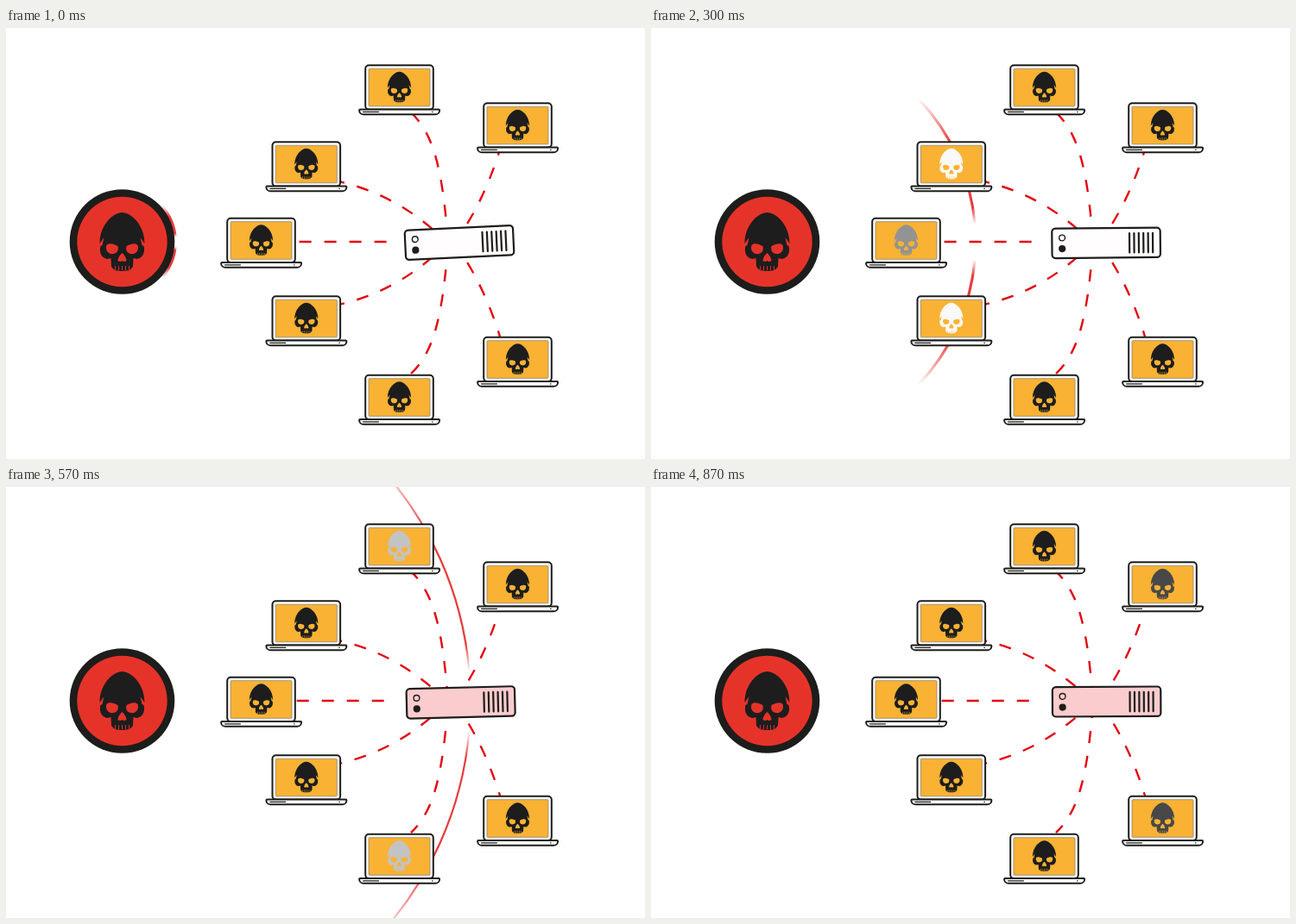
An HTML page with a canvas that plays this animation: 740x500 px, repeating every 0.9 s.

```html
<!DOCTYPE html>
<html lang="en">
<head>
<meta charset="utf-8">
<title>Network attack</title>
<style>
html, body { margin: 0; width: 100%; height: 100%; overflow: hidden; background: #fff; }
canvas { display: block; }
</style>
</head>
<body>
<canvas id="stage" width="740" height="500"></canvas>
<script>
const ctx = document.getElementById('stage').getContext('2d');
const LOOP = 900, PULSE = 300;
const INK = '#1d1d1b', RED = '#e6332a', LINE = '#e30613', ORANGE = '#f9b233';
const BADGE = { x: 134.5, y: 248, r: 60.8 };

// x, y of the skull and the moment the wave reaches it
const laptops = [
  [295.5, 246, 190], [347.8, 157.5, 285], [347.8, 336.5, 285],
  [455.5, 68.5, 505], [455.5, 428, 505], [592.5, 112.5, 690], [592.5, 384, 690]
];

// Upper links and the dash phase of each; the lower ones mirror them
const links = [
  ['M385 178C425 187 462 205 497 236', -7],
  ['M469 98C497 124 505 170 511 236', 0],
  ['M572 141C563 170 550 203 529 235', -7]
].map(([d, phase]) => [new Path2D(d), phase]);
const middleLink = new Path2D('M330 248H448');

// time, x, y, degrees of the shaking server
const shake = [
  [0, 525, 249, -2.7], [210, 526.5, 248.2, -1.7], [360, 527.5, 250, 0.2],
  [480, 527.3, 250, -0.6], [660, 526, 249.8, -2.2], [780, 528, 249.5, -0.5],
  [870, 527.7, 249, -0.2], [900, 525, 249, -2.7]
];

const skull = new Path2D(
  'M0-34C10-34 26-20 26 2L21-5L23 4L25 5C27 12 24 19 17 20L13 19L12.5 29Q10 32 8 33Q0 35-8 33' +
  'Q-10 32-12.5 29L-13 19L-17 20C-24 19-27 12-25 5L-23 4L-21-5L-26 2C-26-20-10-34 0-34Z' +
  'M5 5C10 2 16 1 18 4C20 10 16 15 10 14C5 13 4 9 5 5Z' +
  'M-5 5C-10 2-16 1-18 4C-20 10-16 15-10 14C-5 13-4 9-5 5Z' +
  'M0 13C3 15 5 20 5 22Q2 24 0 22Q-2 24-5 22C-5 20-3 15 0 13Z' +
  [-8, -4, 0, 4, 8].map(x => `M${x - 0.45} 28h.9v5.2h-.9Z`).join(''));

const clamp = v => Math.max(0, Math.min(1, v));
const mix = (a, b, k) => a + (b - a) * k;

function at(x, y, draw) {
  ctx.save();
  ctx.translate(x, y);
  draw();
  ctx.restore();
}

function box(x, y, w, h, r, fill, stroke, width) {
  ctx.beginPath();
  ctx.roundRect(x, y, w, h, r);
  ctx.fillStyle = fill;
  ctx.fill();
  ctx.strokeStyle = stroke;
  ctx.lineWidth = width;
  ctx.stroke();
}

function disc(x, y, r, fill) {
  ctx.beginPath();
  ctx.arc(x, y, r, 0, 2 * Math.PI);
  ctx.fillStyle = fill;
  ctx.fill();
}

function segment(x1, y1, x2, y2, width) {
  ctx.beginPath();
  ctx.moveTo(x1, y1);
  ctx.lineTo(x2, y2);
  ctx.strokeStyle = INK;
  ctx.lineWidth = width;
  ctx.lineCap = 'round';
  ctx.stroke();
}

function drawSkull(scale, white) {
  const c = Math.round(mix(29, 255, white));
  ctx.scale(scale, scale);
  ctx.fillStyle = `rgb(${c},${c},${c})`;
  ctx.fill(skull, 'evenodd');
}

function drawLinks(t) {
  ctx.save();
  ctx.strokeStyle = LINE;
  ctx.lineWidth = 2.4;
  ctx.setLineDash([14, 15]);
  const dashes = (path, phase) => {
    ctx.lineDashOffset = -phase - 29 * t / PULSE;
    ctx.stroke(path);
  };
  dashes(middleLink, 9.5);
  links.forEach(link => dashes(...link));
  ctx.translate(0, 499);
  ctx.scale(1, -1);
  links.forEach(link => dashes(...link));
  ctx.restore();
}

function drawWave(t) {
  const alpha = Math.min(0.9, (770 - t) / 180);
  if (alpha <= 0) return;
  const r = BADGE.r + 0.6 * t;
  ctx.lineWidth = 4 - t / 330;
  ctx.lineCap = 'butt';
  for (const side of [-1, 1]) {
    const fade = ctx.createLinearGradient(0, BADGE.y + side * r * 0.085, 0, BADGE.y + side * r * 0.69);
    [[0, 0], [0.13, 1], [0.65, 1], [1, 0]].forEach(([stop, k]) =>
      fade.addColorStop(stop, `rgba(227,40,40,${alpha * k})`));
    ctx.strokeStyle = fade;
    ctx.beginPath();
    ctx.arc(BADGE.x, BADGE.y, r, side * 0.085, side * 0.76, side < 0);
    ctx.stroke();
  }
}

function drawServer(t) {
  const i = shake.findIndex(key => key[0] > t);
  const a = shake[i - 1], b = shake[i];
  const [, x, y, angle] = a.map((v, j) => mix(v, b[j], (t - a[0]) / (b[0] - a[0])));
  const p = t % PULSE;
  const glow = clamp(Math.min(p, PULSE - p) / 120);
  const fill = `rgb(${mix(255, 238, glow)},${mix(255, 45, glow)},${mix(255, 47, glow)})`;
  at(x, y, () => {
    ctx.rotate(angle * Math.PI / 180);
    box(-62.7, -17.2, 125.4, 34.4, 4, fill, INK, 2.2);
    ctx.beginPath();
    ctx.arc(-51, -6.3, 3.4, 0, 2 * Math.PI);
    ctx.lineWidth = 1.4;
    ctx.stroke();
    disc(-51, 6.3, 4.1, INK);
    for (let v = 0; v < 6; v++) segment(27 + 5.4 * v, -11, 27 + 5.4 * v, 11.5, 2.2);
  });
}

function drawLaptop(x, y, hit, t) {
  const white = t < hit ? clamp((t - hit + 30) / 30) : clamp(1.05 - (t - hit) / 210);
  at(x, y, () => {
    box(-39.3, -25.2, 78.6, 51.2, 4, '#fff', INK, 2);
    box(-35.5, -21.3, 71, 43.6, 1, ORANGE, '#8b8578', 0.8);
    box(-46.4, 25.9, 93, 5.9, [1, 1, 5, 5], '#fff', INK, 2);
    segment(-42, 28.8, -24, 28.8, 1.2);
    segment(38, 28.8, 38.6, 28.8, 1.2);
    drawSkull(0.525, white);
  });
}

function frame(now) {
  const t = now % LOOP;
  ctx.fillStyle = '#fff';
  ctx.fillRect(0, 0, 740, 500);
  drawLinks(t);
  drawWave(t);
  drawServer(t);
  laptops.forEach(([x, y, hit]) => drawLaptop(x, y, hit, t));
  disc(BADGE.x, BADGE.y, BADGE.r, INK);
  disc(BADGE.x, BADGE.y, 52.2, RED);
  at(BADGE.x, BADGE.y, () => drawSkull(1, 0));
  requestAnimationFrame(() => frame(performance.now() - start));
}

const start = performance.now();
frame(0);
</script>
</body>
</html>
```
